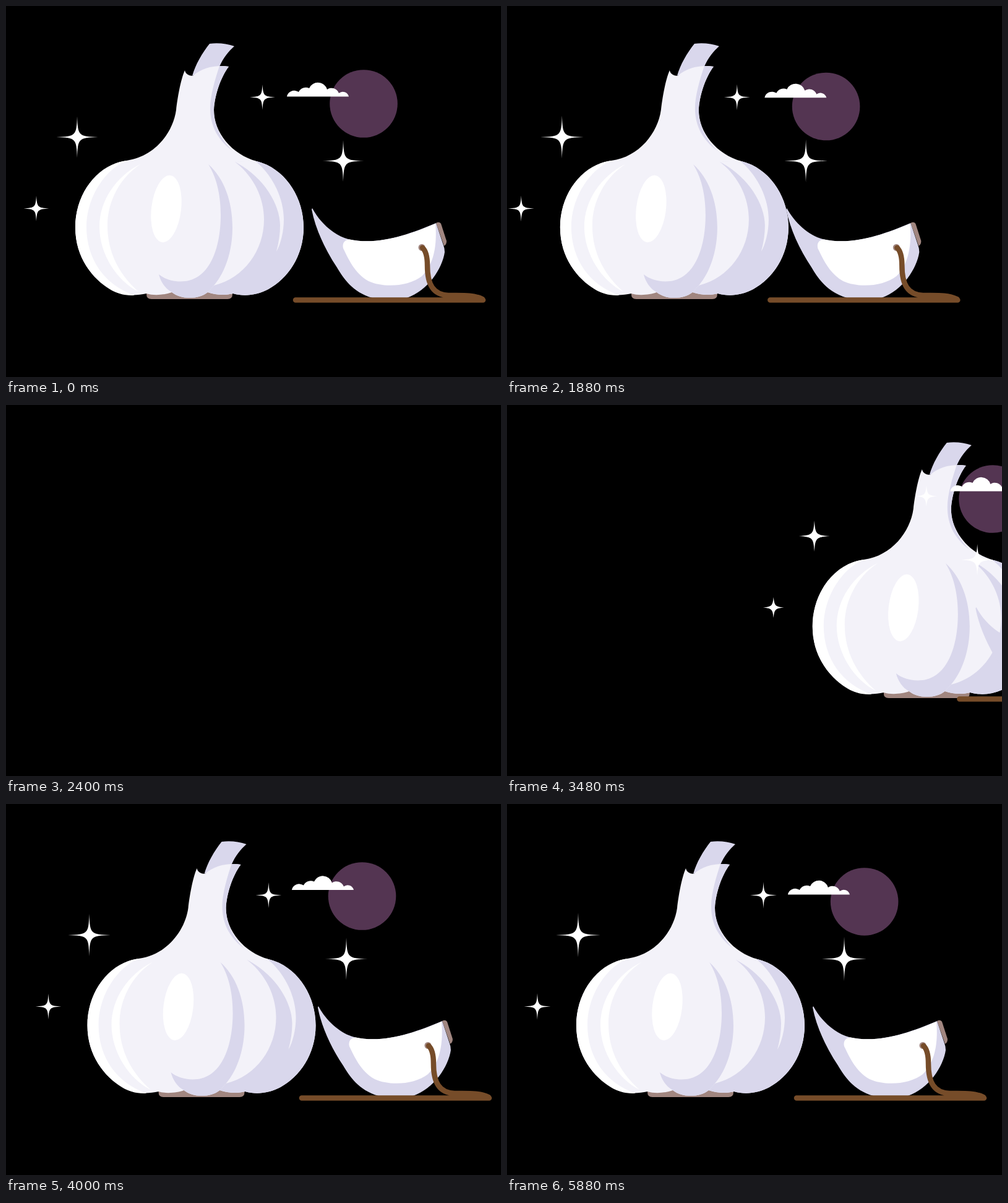
Recreate the animation shown at these times as an HTML page. Size 800 by 600 pixels, loop 5920 ms.

```html
<!DOCTYPE html>
<html lang="en">
<head>
<meta charset="utf-8">
<title>Garlic at night</title>
<style>
  html, body { margin: 0; width: 100%; height: 100%; overflow: hidden; background: #000; }
  svg { display: block; width: 100%; height: 100%; }
  .light { fill: #f3f2f9; }
  .shade { fill: #d9d7ec; }
  .white { fill: #fff; }
  .root { fill: #a18680; }
  .wood { fill: none; stroke: #764c29; stroke-width: 8.5; stroke-linecap: round; }
</style>
</head>
<body>
<svg viewBox="0 0 800 600">
  <g id="scene">
    <g id="bulb">
      <path class="shade" d="M329 61C343 59 357 61 369 65C360 73 351 84 345 98L301 113C306 95 317 76 329 61Z"/>
      <path class="root" d="M227 455H366V466Q366 474 358 474H235Q227 474 227 466Z"/>
      <path class="light" d="M289 104C282 120 277 150 275 168C270 205 240 244 195 250C148 256 112 303 112 358C112 407 140 441 168 458C186 469 209 469 227 465C240 469 257 467 268 463C283 475 311 475 326 463C340 468 355 468 367 465C385 470 405 468 424 458C455 441 481 405 481 358C481 308 450 262 405 251C365 240 336 205 336 168C337 145 347 115 360 98C340 95 318 99 302 113C296 113 290 110 289 104Z"/>
      <path class="shade" d="M345 97Q353 96.500 360 98C347 115 337 145 336 168C336 192 347 216 366 234C343 217 330 195 330 165C330 145 338 118 345 97Z"/>
      <path class="white" d="M195 250C148 256 112 303 112 358C112 407 140 441 168 458C182 467 195 468 208 468C160 452 130 410 130 357C130 310 160 264 195 250Z"/>
      <path class="white" d="M217 256C178 275 151 315 151 357C151 402 180 445 214 462C184 435 164 400 164 355C164 315 185 277 217 256Z"/>
      <ellipse class="white" cx="259" cy="328" rx="24" ry="54.500" transform="rotate(7 259 328)"/>
      <path class="shade" d="M370 252L405 251C450 262 481 308 481 358C481 405 455 441 424 458C405 468 385 470 367 465C355 468 340 468 326 463L336 452C385 440 417 395 417 345C417 310 400 275 370 252Z"/>
      <path class="light" d="M370 252L402 250C430 272 449 310 449 345C449 365 444 385 437 397C441 382 443 368 443 355C443 320 415 275 370 252Z"/>
      <path class="shade" d="M327 256C342 280 347 310 347 338C347 390 330 440 290 445C272 447 257 442 247 434C250 446 257 457 268 463C283 475 311 475 326 463L336 452C355 430 366 395 366 358C366 315 352 278 327 256Z"/>
    </g>
    <circle id="moon" r="54.800" fill="#543552"/>
    <g id="clove">
      <path class="root" d="M695 351Q700 348 703 352L712 380Q712 386 708 388Z"/>
      <path class="shade" d="M495 327C507 350 530 371 553 377C600 388 650 370 695 351L707 387Q709 392 709 398C705 425 682 460 648 472H592C560 463 545 440 535 423C515 393 500 360 494 329Z"/>
      <path class="white" d="M545 392C543 384 547 378 555 377.500C600 387 650 371 694 352C697 385 692 418 672 437C650 454 610 456 586 445C563 432 553 408 545 392Z"/>
      <circle class="root" cx="672" cy="390.500" r="5.500"/>
      <path class="wood" d="M468 475.500H771M673 391C680 397 681 410 681 420C681 450 690 467 715 468C740 468 755 467 770 474"/>
    </g>
    <path id="cloud" class="white" d="M0 0A12 11 0 0 1 19 -7.500A13 13 0 0 1 36 -13.500A15.500 15.500 0 0 1 65 -11.500A12.500 12.500 0 0 1 84 -5.500A10 10 0 0 1 100 0Z"/>
    <g id="stars" class="white"></g>
  </g>
</svg>
<script>
const LOOP = 5920, STEP = 40;
const $ = id => document.getElementById(id);

// Each layer leaves with a cubic ease-in and returns with a cubic ease-out.
const slides = {
  bulb: { leave: 1610, settle: 4307, pace: 114 },
  clove: { leave: 1562, settle: 4262, pace: 122 },
  sky: { leave: 1520, settle: 4208, pace: 121.5 }
};
const cube = v => v * v * v;
const offset = ({ leave, settle, pace }, t) => t < 2800
  ? -cube(Math.max(0, t - leave) / 91)
  : cube(Math.max(0, settle - t) / pace);

// Keys: [time, x, y]
const moonKeys = [[0, 578, 158], [600, 581.5, 160.3], [880, 581.5, 163], [1880, 577.5, 162.5],
  [3480, 570, 152], [4000, 570.5, 149], [4500, 573, 150.7], [5100, 575.3, 156.8],
  [5680, 575.5, 158.3], [LOOP, 578, 158]];
const cloudKeys = [[0, 454, 146.5], [880, 457, 143.3], [1880, 459, 148.3],
  [3480, 453, 139.5], [4000, 452, 139], [LOOP, 454, 146.5]];
const twinkleKeys = [[0, .9], [900, 0], [1900, .97], [2900, 0], [3940, 1], [4820, 0], [5720, 1], [LOOP, 1]];

const stars = [
  { x: 115, y: 212, min: 11, max: 36, layer: 'bulb' },
  { x: 49, y: 327.5, min: 11, max: 21.5, layer: 'bulb' },
  { x: 414.5, y: 147.5, min: 11, max: 21.5, layer: 'clove' },
  { x: 545, y: 250.5, min: 12, max: 36, layer: 'sky' }
];
for (const star of stars) {
  star.el = document.createElementNS('http://www.w3.org/2000/svg', 'path');
  $('stars').append(star.el);
}

const segment = (keys, t) => Math.max(0, keys.findIndex(k => k[0] > t) - 1);

function linear(keys, t) {
  const i = segment(keys, t), [a, from] = keys[i], [b, to] = keys[i + 1];
  return from + (to - from) * (t - a) / (b - a);
}

// Cubic Hermite through the keys, closed over the loop
function smooth(keys, t, axis) {
  const n = keys.length - 1, i = segment(keys, t);
  const key = j => {
    const turn = Math.floor(j / n), k = keys[j - turn * n];
    return [k[0] + turn * LOOP, k[axis]];
  };
  const slope = j => {
    const p = key(j - 1), q = key(j + 1);
    return (q[1] - p[1]) / (q[0] - p[0]);
  };
  const [a, from] = key(i), [b, to] = key(i + 1), d = b - a, u = (t - a) / d, v = 1 - u;
  return v * v * (1 + 2 * u) * from + u * u * (3 - 2 * u) * to
    + d * u * v * (v * slope(i) - u * slope(i + 1));
}

function starPath(size, glow) {
  const a = 2 - glow, b = 4 - 2 * glow;
  return `M0 ${-size}C${a} ${-b} ${b} ${-a} ${size} 0C${b} ${a} ${a} ${b} 0 ${size}` +
    `C${-a} ${b} ${-b} ${a} ${-size} 0C${-b} ${-a} ${-a} ${-b} 0 ${-size}Z`;
}

const place = (el, x, y) => el.setAttribute('transform', `translate(${x} ${y})`);

function draw(now) {
  const t = Math.floor(now % LOOP / STEP) * STEP;
  const dx = {};
  for (const name in slides) dx[name] = offset(slides[name], t);

  $('scene').style.display = t >= 2400 && t < 3320 ? 'none' : '';
  place($('bulb'), dx.bulb, 0);
  place($('clove'), dx.clove, 0);
  place($('moon'), dx.sky + smooth(moonKeys, t, 1), smooth(moonKeys, t, 2));
  place($('cloud'), dx.clove + smooth(cloudKeys, t, 1), smooth(cloudKeys, t, 2));

  const glow = linear(twinkleKeys, t);
  for (const { el, x, y, min, max, layer } of stars) {
    place(el, x + dx[layer], y);
    el.setAttribute('d', starPath(min + (max - min) * glow, glow));
  }
}

const start = performance.now();
function tick() {
  draw(performance.now() - start);
  requestAnimationFrame(tick);
}
tick();
</script>
</body>
</html>
```
